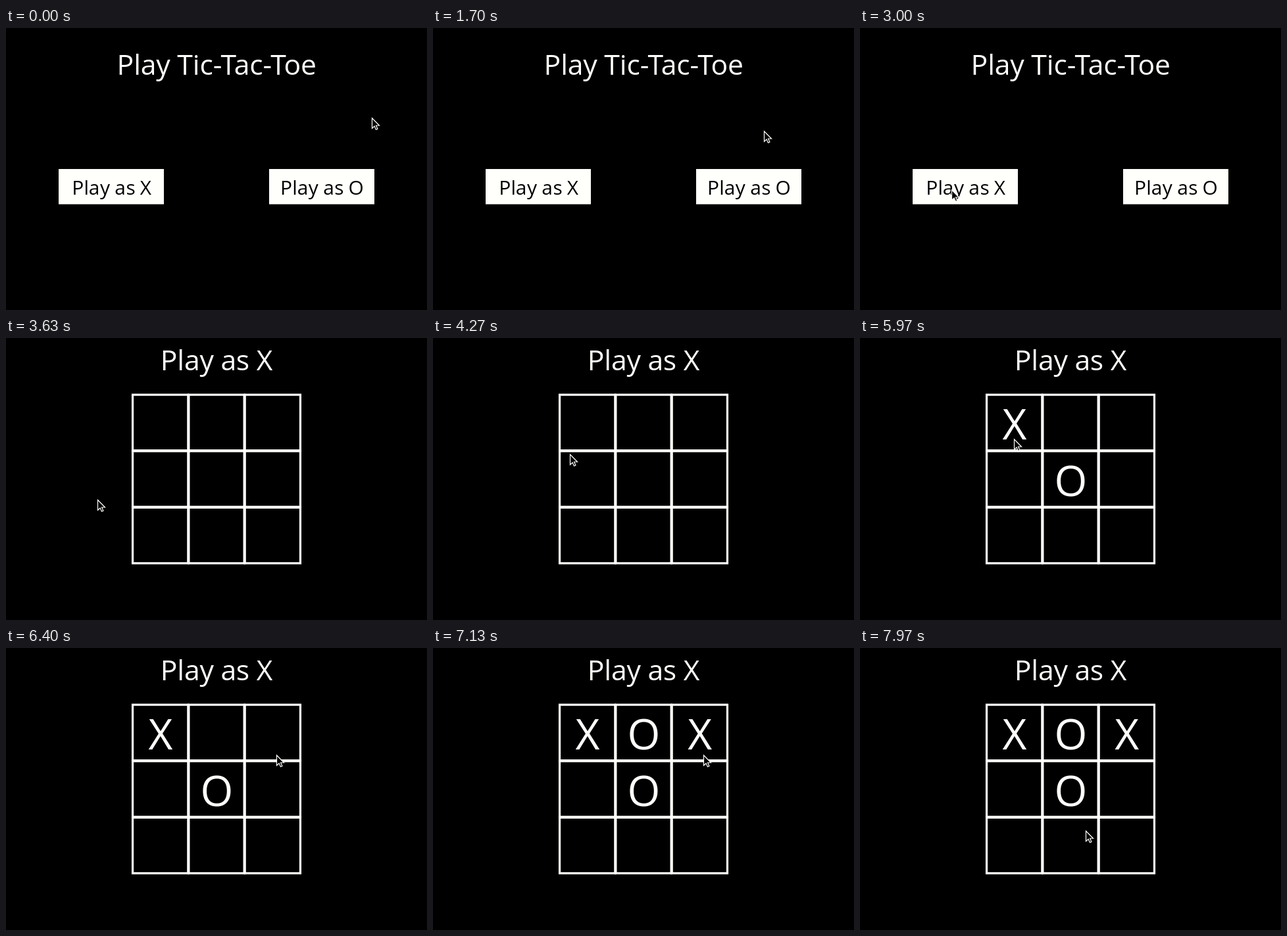
An HTML page with a canvas for the animation above (8000 ms loop, 640x428 px).

```html
<!DOCTYPE html>
<html lang="en">
<head>
<meta charset="utf-8">
<title>Tic-Tac-Toe</title>
<style>
  html, body { margin: 0; width: 100%; height: 100%; overflow: hidden; background: #000; }
  canvas { display: block; }
</style>
</head>
<body>
<canvas id="stage" width="640" height="428"></canvas>
<script>
const ctx = document.getElementById('stage').getContext('2d');
const LOOP = 8000;
const SCALE_X = 640 / 600, SCALE_Y = 428 / 400;   // the game is laid out on 600 x 400
const WHITE = '#fffffc';
const TILE = 80, BOARD_X = 180, BOARD_Y = 80;

const BOARD_AT = 3630;
const MOVES = [
  { at: 4800, mark: 'X', col: 0, row: 0 },
  { at: 5430, mark: 'O', col: 1, row: 1 },
  { at: 6530, mark: 'X', col: 2, row: 0 },
  { at: 7070, mark: 'O', col: 1, row: 0 },
];

const EASE = {
  hold: () => 0,
  linear: p => p,
  in: p => p * p,
  out: p => p * (2 - p),
  both: p => p * p * (3 - 2 * p),
};

// Pointer stops: time, x, y and the easing used to arrive there.
const POINTER = [
  [0, 556, 136],
  [1070, 557, 136, 'hold'],
  [1537, 557, 136, 'hold'],
  [1700, 504, 156, 'in'],
  [1900, 356, 205, 'out'],
  [2100, 356, 205, 'hold'],
  [2430, 150, 221, 'both'],
  [2770, 150, 221, 'hold'],
  [3000, 139, 245, 'both'],
  [3630, 139, 245, 'hold'],
  [4030, 200, 190, 'both'],
  [4170, 200, 190, 'hold'],
  [4270, 208, 176, 'linear'],
  [4670, 232, 153, 'out'],
  [5940, 232, 153, 'hold'],
  [6400, 411, 162, 'both'],
  [7440, 411, 162, 'hold'],
  [7570, 415, 185, 'in'],
  [7730, 372, 255, 'linear'],
  [7850, 342, 285, 'out'],
  [7970, 343, 277, 'both'],
  [LOOP, 343, 277, 'hold'],
];

function pointerAt(t) {
  const i = POINTER.findIndex(stop => stop[0] > t);
  const [t0, x0, y0] = POINTER[i - 1];
  const [t1, x1, y1, ease] = POINTER[i];
  const p = EASE[ease]((t - t0) / (t1 - t0));
  return [Math.round(x0 + (x1 - x0) * p), Math.round(y0 + (y1 - y0) * p)];
}

const widthOf = text => ctx.measureText(text).width;

// Glyph advances and kerning snap to whole layout pixels.
function centerText(text, x, y, size, color = WHITE) {
  ctx.font = `${size}px "Open Sans", sans-serif`;
  ctx.fillStyle = color;
  let width = 0;
  const glyphs = [...text].map((char, i) => {
    const previous = text[i - 1] || '';
    width += Math.round(widthOf(previous + char) - widthOf(previous) - widthOf(char));
    const offset = width;
    width += Math.round(widthOf(char));
    return { char, offset };
  });
  const left = x - Math.floor(width / 2);
  const baseline = y + Math.ceil(size * 0.388);
  for (const { char, offset } of glyphs) ctx.fillText(char, left + offset, baseline);
}

function drawButton(text, x) {
  ctx.fillStyle = WHITE;
  ctx.fillRect(x, 200, 150, 50);
  centerText(text, x + 75, 225, 28, '#000');
}

function drawMenu() {
  centerText('Play Tic-Tac-Toe', 300, 50, 40);
  drawButton('Play as X', 75);
  drawButton('Play as O', 375);
}

function drawGame(t) {
  const played = MOVES.filter(move => move.at <= t);
  const thinking = played.length % 2 === 1;
  centerText(thinking ? 'Computer thinking...' : 'Play as X', 300, 30, 40);

  // Each tile border straddles its edge, so inner lines come out thicker.
  ctx.strokeStyle = WHITE;
  ctx.lineWidth = 3;
  for (let row = 0; row < 3; row++) {
    for (let col = 0; col < 3; col++) {
      ctx.strokeRect(BOARD_X + col * TILE + 0.5, BOARD_Y + row * TILE + 0.5, TILE - 1, TILE - 1);
    }
  }
  for (const { mark, col, row } of played) {
    centerText(mark, BOARD_X + (col + 0.5) * TILE, BOARD_Y + (row + 0.5) * TILE, 60);
  }
}

const ARROW = new Path2D('M0 0V15.5L3.6 12.2L6 17.5L8.4 16.5L6.1 11.2H11Z');

function drawPointer(x, y) {
  ctx.setTransform(1, 0, 0, 1, x + 0.5, y + 0.8);
  ctx.fillStyle = '#000';
  ctx.fill(ARROW);
  ctx.strokeStyle = WHITE;
  ctx.lineWidth = 1.2;
  ctx.stroke(ARROW);
}

function render(now) {
  const t = now % LOOP;
  ctx.setTransform(1, 0, 0, 1, 0, 0);
  ctx.fillStyle = '#000';
  ctx.fillRect(0, 0, 640, 428);
  ctx.setTransform(SCALE_X, 0, 0, SCALE_Y, 0, 0);
  if (t < BOARD_AT) drawMenu();
  else drawGame(t);
  drawPointer(...pointerAt(t));
}

const start = performance.now();
function tick() {
  render(performance.now() - start);
  requestAnimationFrame(tick);
}
tick();
</script>
</body>
</html>
```
